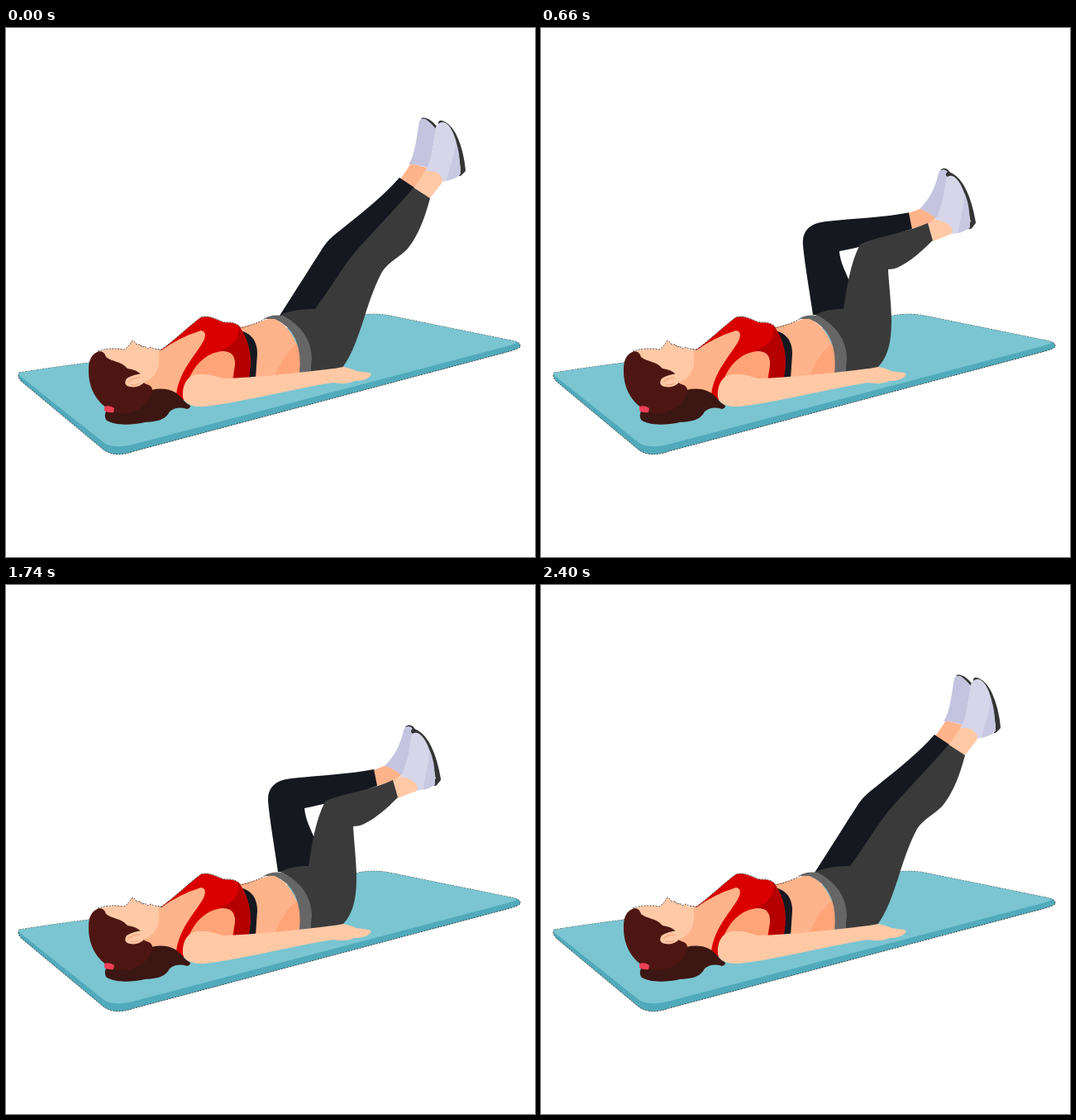
Animation of 640 by 640 pixels, one loop 2730 ms. Source, as an HTML page without scripts:

```html
<!DOCTYPE html>
<html lang="en">
<head>
<meta charset="utf-8">
<title>Leg raise</title>
<style>
html, body { margin: 0; width: 100%; height: 100%; overflow: hidden; background: #fff; }
svg { display: block; width: 100%; height: 100%; }

/* Each moving part carries four poses: --a legs raised … --d knees bent */
.m { d: var(--a); animation: pose 2730ms infinite; }
@keyframes pose {
  0%      { d: var(--a); animation-timing-function: cubic-bezier(.333, 0, .667, .44); }
  14.286% { d: var(--b); animation-timing-function: cubic-bezier(.333, .35, .667, .733); }
  24.176% { d: var(--c); animation-timing-function: cubic-bezier(.333, .626, .667, 1); }
  32.967% { d: var(--d); animation-timing-function: linear; }
  54.945% { d: var(--d); animation-timing-function: cubic-bezier(.333, 0, .667, .374); }
  63.736% { d: var(--c); animation-timing-function: cubic-bezier(.333, .267, .667, .65); }
  73.626% { d: var(--b); animation-timing-function: cubic-bezier(.333, .56, .667, 1); }
  87.912%, 100% { d: var(--a); }
}

.skin { fill: #ffc9a6; }
.tan { fill: #ffb38a; }
.shade { fill: #ffa478; }
.lilac { fill: #c4c4e0; }
.pale { fill: #d6d5e9; }
.rim { stroke: #222; stroke-width: .8; stroke-dasharray: 2 1.5; }
.sole { fill: none; stroke: #343434; stroke-linecap: round; stroke-linejoin: round; }

#farAnkle {
  --a: path("M477 183 L490 164 L513 170 L511 182 L497 195Z");
  --b: path("M464 195 L482 182 L499 188 L498 200 L477 212Z");
  --c: path("M444 224 L460 218 L479 229 L470 237 L448 243Z");
  --d: path("M431 241 L448 238 L468 245 L458 250 L435 254Z");
}
#farLeg {
  --a: path("M331 348 C351 317 369 288 382 268 C389 256 399 249 409 241 C431 223 455 205 476 181 L497 195 C470 230 440 265 420 285 C405 300 390 320 385 330 L372 346Z");
  --b: path("M332 348 C339 318 345 290 349 265 C351 249 356 241 370 235 C400 221 435 214 464 193 L478 212 C457 234 428 246 392 267 C389 280 390 296 386 310 L370 346Z");
  --c: path("M329 347 C324 312 319 285 317 262 C316 244 327 236 345 234 C380 230 415 229 445 223 L449 243 C430 249 405 262 361 270 C362 283 368 294 373 306 L368 348Z");
  --d: path("M327 347 C317 315 307 290 303 268 C300 248 310 239 328 239 C365 240 400 241 431 241 L436 254 C420 262 390 274 351 275 C353 286 360 296 368 308 L366 350Z");
}
#farSole {
  --a: path("M504 110 C511 110 516 115 520 120");
  --b: path("M500 131 C507 129 513 136 516 143");
  --c: path("M485 172 C490 169 494 174 495 179");
  --d: path("M474 195 C479 191 485 192 490 195");
}
#farShoe {
  --a: path("M487 165 C495 154 497 130 500 113 C502 109 507 109 510 112 C514 115 518 119 520 123 L512 170 C503 167 495 164 487 165Z");
  --b: path("M479 184 C491 170 494 148 496 136 C499 130 504 130 508 133 C511 136 513 140 515 144 L500 192 C494 186 487 182 479 184Z");
  --c: path("M458 219 C472 205 478 190 481 175 C484 170 489 170 492 174 C494 177 495 179 495 182 L479 231 C472 225 465 220 458 219Z");
  --d: path("M446 240 C460 228 465 212 471 197 C473 193 478 193 481 194 C482 196 482 200 481 204 L467 247 C460 243 454 240 446 240Z");
}
#nearAnkle {
  --a: path("M493 194 L509 170 L530 176 L527 188 L512 207Z");
  --b: path("M484 212 L497 199 L520 204 L517 214 L498 229Z");
  --c: path("M468 237 L478 231 L502 238 L497 249 L474 258Z");
  --d: path("M457 249 L468 246 L490 256 L487 264 L463 270Z");
}
#nearLeg {
  --a: path("M332 347 C345 341 360 340 374 340 C395 311 410 285 425 268 C450 240 475 215 493 193 L513 206 C508 225 500 250 485 268 C475 278 463 283 455 295 C444 316 438 336 432 355 C425 375 419 395 407 411 C398 415 385 418 368 418 C372 385 358 360 332 347Z");
  --b: path("M332 347 C345 341 358 340 371 340 C380 318 392 285 406 262 C420 245 461 237 484 211 L498 229 C488 249 472 270 458 279 C450 284 443 285 438 287 C434 310 430 335 428 352 C425 380 419 399 407 411 C398 415 385 418 368 418 C372 385 358 360 332 347Z");
  --c: path("M332 347 C343 341 355 340 366 340 C370 315 374 285 386 262 C398 254 440 249 468 236 L474 257 C460 271 447 282 435 288 C430 291 424 292 420 292 C421 311 424 335 424 354 C424 382 419 399 407 411 C398 415 385 418 368 418 C372 385 358 360 332 347Z");
  --d: path("M332 347 C343 341 354 340 364 340 C366 315 367 287 375 267 C384 256 430 257 458 249 L463 270 C450 277 440 286 430 292 C425 295 419 296 414 297 C416 313 423 335 424 354 C425 382 419 399 407 411 C398 415 385 418 368 418 C372 385 358 360 332 347Z");
}
#nearSole {
  --a: path("M526 115 C540 118 550 143 553 172 L549 176");
  --b: path("M517 144 C531 149 540 173 543 199 L539 204");
  --c: path("M493 177 C508 182 518 206 523 235 L519 240");
  --d: path("M480 194 C496 195 507 220 512 248 L508 253");
}
#nearShoe {
  --a: path("M507 173 C516 160 517 138 520 120 C523 114 528 113 532 115 C543 122 548 145 550 176 C547 181 540 183 528 186 C528 176 518 172 507 173Z");
  --b: path("M497 200 C506 185 508 165 511 149 C513 144 518 142 522 145 C533 152 538 175 539 206 C534 210 528 213 517 215 C520 204 508 200 497 200Z");
  --c: path("M477 232 C487 215 488 195 490 183 C492 178 496 178 500 180 C511 188 518 212 519 241 C513 246 506 248 497 249 C501 240 488 233 477 232Z");
  --d: path("M466 247 C472 235 473 215 474 200 C476 194 481 193 485 195 C499 203 507 230 508 255 C503 260 498 262 488 264 C489 255 476 248 466 247Z");
}
#heel {
  --a: path("M543 135 C546 148 537 166 533 185 C540 183 547 181 550 176 C549 157 548 146 543 135Z");
  --b: path("M533 164 C534 178 526 196 525 213 C532 211 536 209 539 206 C539 186 537 174 533 164Z");
  --c: path("M512 199 C513 214 506 231 505 248 C512 246 516 244 519 241 C519 221 517 209 512 199Z");
  --d: path("M500 214 C502 228 497 246 494 263 C502 261 506 258 508 255 C508 235 505 223 500 214Z");
}
</style>
</head>
<body>
<svg viewBox="0 0 640 640">
  <g id="mat">
    <path class="rim" fill="#51aabb" d="M16 417 Q60 410 100 405 L432 347 Q448 345 464 348 L616 379 Q623 381 622 386 Q620 388 610 391 L155 512 Q133 520 119 511 L18 427 Q13 421 16 417Z"/>
    <path fill="#7ac5d1" d="M16 417 Q60 410 100 405 L432 347 Q448 345 464 348 L616 379 Q622 380 610 384 L153 504 Q133 509 120 503 L17 421 Q14 418 16 417Z"/>
  </g>

  <g id="legs">
    <path id="farAnkle" class="m tan"/>
    <path id="farLeg" class="m" fill="#161820"/>
    <path id="farSole" class="m sole" stroke-width="3"/>
    <path id="farShoe" class="m lilac"/>
    <path id="nearAnkle" class="m skin"/>
    <path id="nearSole" class="m sole" stroke-width="6"/>
    <path id="nearLeg" class="m" fill="#3a3a3a"/>
    <path id="nearShoe" class="m pale"/>
    <path id="heel" class="m" fill="#c9c8e2"/>
  </g>

  <g id="torso">
    <path class="tan" d="M283 362 Q303 358 322 350 Q356 365 358 418 L298 426Z"/>
    <path class="shade" d="M352 382 Q336 394 324 424 L357 418 Q358 396 352 382Z"/>
    <path fill="#666" d="M312 352 Q320 346 335 348 Q369 366 370 400 L368 418 L355 418 Q360 367 325 352Z"/>
    <path fill="#161820" d="M283 366 Q304 371 304 394 L302 424 L293 426 L290 375Z"/>
    <path fill="#da0000" d="M187 390 C205 377 222 360 236 350 C246 347 254 353 263 356 C271 357 279 355 284 364 C297 384 298 405 293 426 L262 429 L215 450 L205 447 C205 420 195 400 187 390Z"/>
    <path fill="#b40000" d="M281 359 C297 381 298 405 293 426 L275 426 C281 405 272 392 259 390 C272 386 284 378 281 359Z"/>
    <path class="tan" d="M180 389 L188 390 Q210 374 236 366 Q243 367 240 376 C235 390 209 413 206 444 L176 438 L160 425Z"/>
    <path class="shade" d="M217 440 C221 416 237 393 262 391 Q278 391 277 408 L274 427 L235 432Z"/>
    <path class="skin" d="M214 447 C213 432 219 420 232 419 Q246 418 262 424 C300 423 355 417 388 413 Q399 412 408 410 Q418 412 424 415 L439 417 Q443 418 441 421 Q435 427 422 427 Q411 432 396 429 C350 436 285 453 240 458 Q218 459 214 447Z"/>
  </g>

  <g id="head">
    <path class="skin" d="M111 392 Q126 386 143 389 Q149 385 152 379 Q155 377 158 383 L163 383 L164 386 L168 385 L171 388 L175 386 L179 389 L184 388 C187 404 185 421 170 427 L155 437 L120 420Z"/>
    <path fill="none" class="rim" d="M111 391 Q126 386 143 389 Q149 385 152 379 Q155 377 158 383 L163 383 L164 386 L168 385 L171 388 L175 386 L179 388 L188 389 C205 377 222 360 236 350 Q246 347 263 356 Q279 355 284 363 Q303 358 313 352"/>
    <path fill="#3c1613" d="M122 462 C142 466 160 456 176 438 Q192 434 205 441 C214 447 215 453 222 456 Q225 459 219 461 Q207 457 198 464 C192 476 179 476 168 477 C150 481 130 481 121 474 Q118 468 122 462Z"/>
    <path fill="#4e1612" d="M113 391 Q119 391 121 398 C130 405 138 402 147 412 Q158 413 164 420 Q164 429 170 431 Q178 433 177 440 C172 459 154 468 132 465 C112 457 99 438 100 412 Q100 395 113 391Z"/>
    <path class="skin" d="M166 418 Q154 419 146 424 Q141 432 150 434 Q160 436 167 429Z"/>
    <path fill="none" stroke="#f4a57f" stroke-width="1.3" d="M162 423 Q151 423 148 429 M161 430 Q155 433 151 431"/>
    <path fill="#ef3f57" d="M119 458 Q126 456 131 460 L130 465 Q124 466 119 463Z"/>
  </g>
</svg>
</body>
</html>
```
